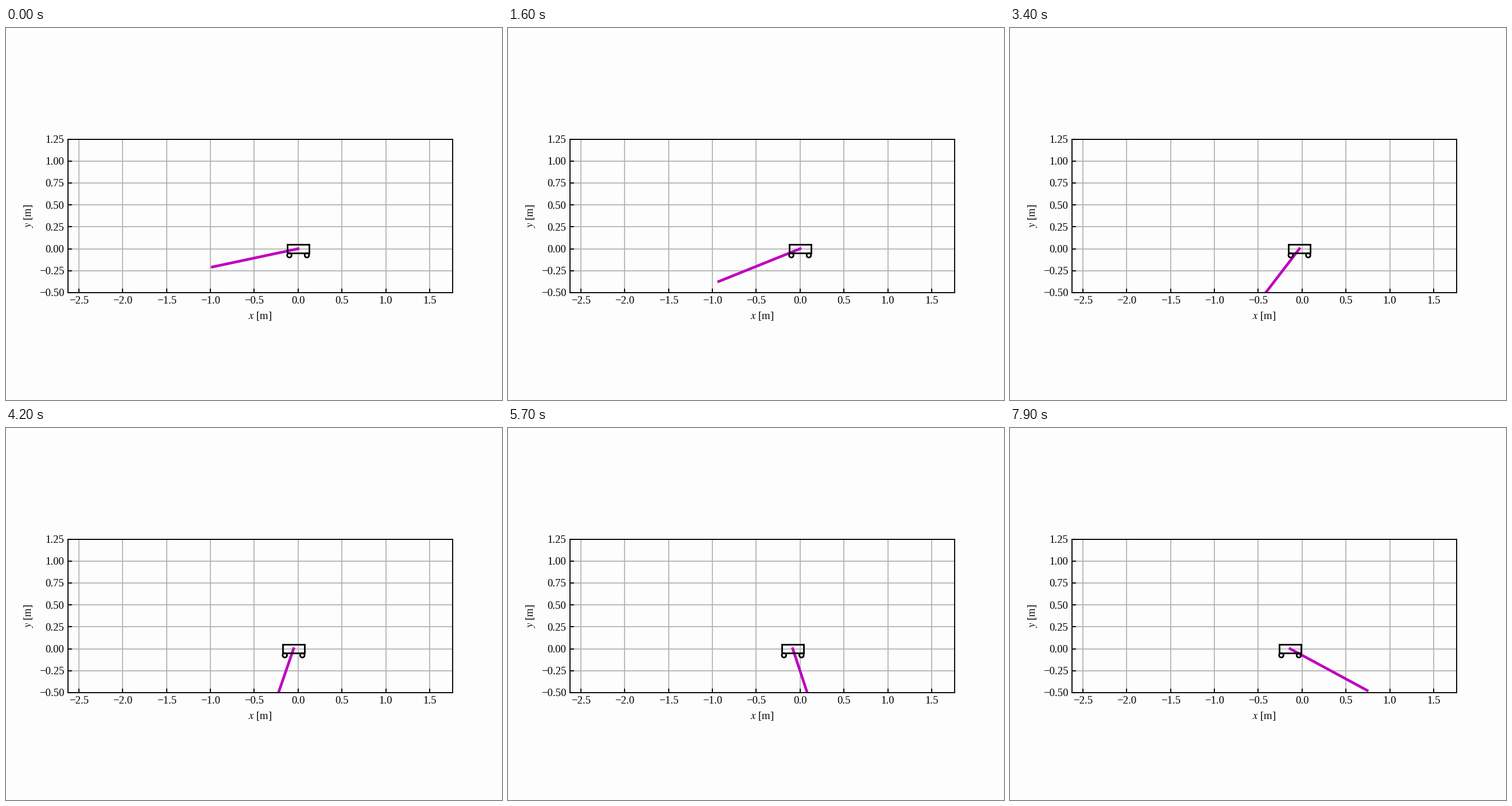
Animation, 864 px wide and 648 px high, one loop 8000 ms. Source, as a matplotlib script:

```python
import numpy as np
import matplotlib.pyplot as plt
from matplotlib.animation import FuncAnimation
from matplotlib.patches import Circle, Rectangle

plt.rcParams.update({
    "font.family": "Liberation Serif",
    "mathtext.fontset": "stix",
    "font.size": 10,
    "axes.linewidth": 1.0,
    "xtick.direction": "in",
    "ytick.direction": "in",
    "xtick.major.width": 1.0,
    "ytick.major.width": 1.0,
})

FRAMES, INTERVAL = 80, 100
BACK = "#fdfdfd"
CART_W, CART_H = 0.25, 0.1
WHEEL_X, WHEEL_Y, WHEEL_R = 0.1, -0.075, 0.025
LENGTH = 1.0

# Slow-motion pendulum: angle from straight down, in radians
START, START_SPEED = np.radians(-78), np.radians(0.7)
GRAVITY, DAMPING = 0.124, 0.005


def swing(steps=100):
    """Pole angle at every frame, by small semi-implicit Euler steps."""
    dt = INTERVAL / 1000 / steps
    angle, speed = START, START_SPEED
    angles = []
    for _ in range(FRAMES):
        angles.append(angle)
        for _ in range(steps):
            speed -= (GRAVITY * np.sin(angle) + DAMPING * speed) * dt
            angle += speed * dt
    return angles


def cart_x(t):
    """Slow drift to the left, then a quickening push."""
    s = np.clip((t - 1.4) / 5.1, 0, 1)
    drift = 0.09 * s * s * (3 - 2 * s)
    push = 0.033 * max(t - 6.7, 0) ** 2
    return -drift - push


fig = plt.figure(figsize=(6.4, 4.8), dpi=135, facecolor=BACK)
ax = fig.add_subplot(facecolor=BACK)
ax.set_aspect("equal")
ax.set_xlim(-2.625, 1.76)
ax.set_ylim(-0.5, 1.25)
ax.set_xticks(np.arange(-2.5, 1.6, 0.5))
ax.set_yticks(np.arange(-0.5, 1.3, 0.25))
ax.set_xlabel("$x$ [m]")
ax.set_ylabel("$y$ [m]")
ax.grid(color="#b0b0b0", lw=0.9)

pole, = ax.plot([], [], color="m", lw=2.5, solid_capstyle="projecting", zorder=2)
style = dict(fill=False, ec="k", lw=1.5, zorder=2.2)
body = ax.add_patch(Rectangle((0, -CART_H / 2), CART_W, CART_H, **style))
wheels = [ax.add_patch(Circle((0, WHEEL_Y), WHEEL_R, **style)) for _ in range(2)]
angles = swing()


def update(i):
    x = cart_x(i * INTERVAL / 1000)
    a = angles[i]
    pole.set_data([x, x + LENGTH * np.sin(a)], [0, -LENGTH * np.cos(a)])
    body.set_x(x - CART_W / 2)
    for wheel, side in zip(wheels, (-1, 1)):
        wheel.center = (x + side * WHEEL_X, WHEEL_Y)
    return [pole, body, *wheels]


anim = FuncAnimation(fig, update, frames=FRAMES, interval=INTERVAL,
                     repeat=True, repeat_delay=0)
plt.show()
```
